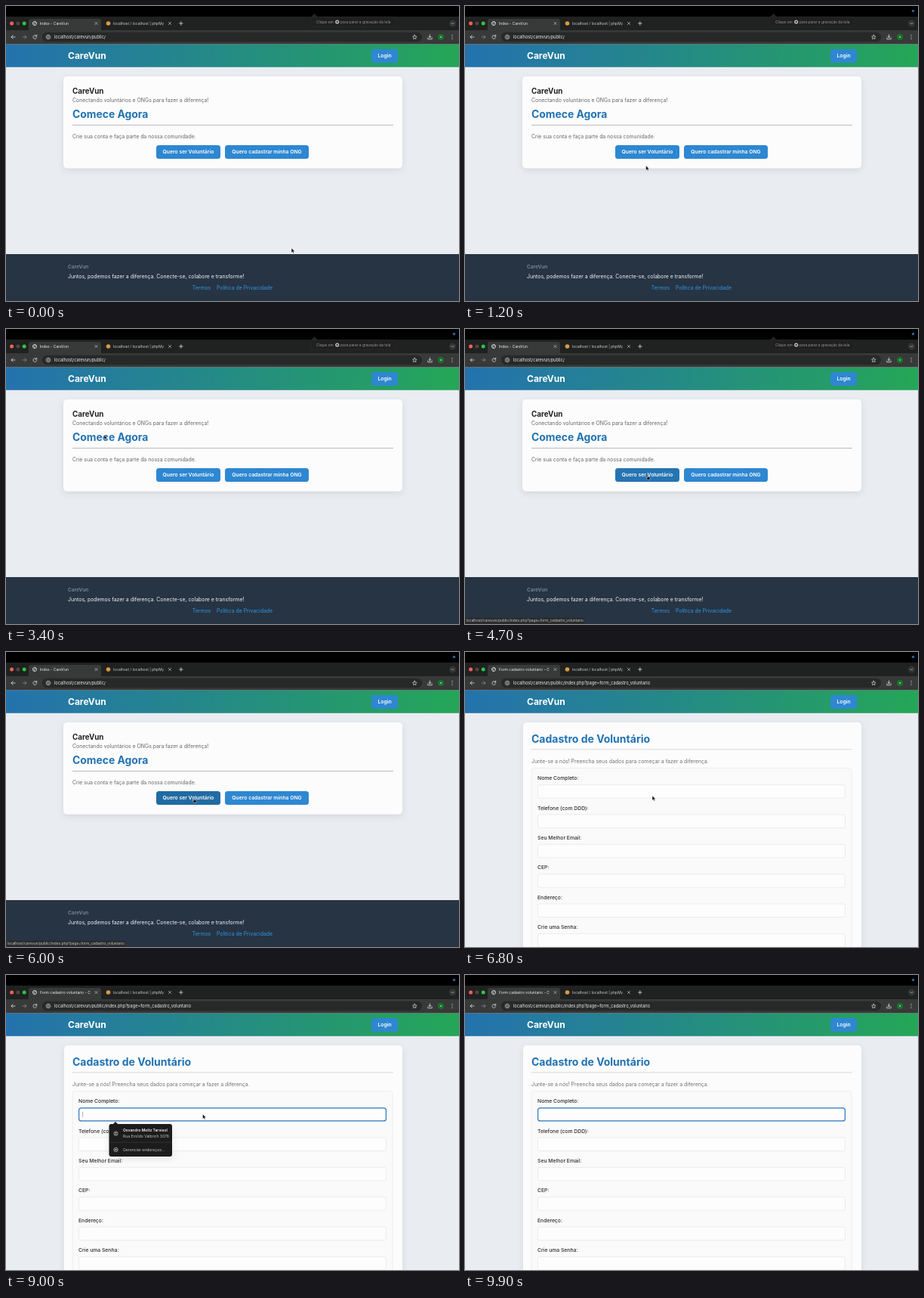
An HTML page for the animation above (10000 ms loop, 600 by 390 pixels).

```html
<!DOCTYPE html>
<html lang="pt-BR">
<head>
<meta charset="utf-8">
<title>CareVun</title>
<style>
html, body { margin: 0; width: 100%; height: 100%; overflow: hidden; background: #000; }
svg { display: block; width: 100%; height: 100%; }
text { font-family: Inter, "Open Sans", sans-serif; white-space: pre; }
</style>
</head>
<body>
<svg id="stage" viewBox="0 0 600 390"></svg>
<script>
const LOOP = 10000;
const FORM_OPENS = 6300, FIELD_FOCUS = 7400, DISMISS = 9200;
const BLUE = '#2e87d1';
const BODY = 6.9;
const brand = 'CareVun';
const baseUrl = 'localhost/carevun/public/';
const formUrl = baseUrl + 'index.php?page=form_cadastro_voluntario';

const rect = (x, y, w, h, fill, r = 0, extra = '') =>
  `<rect x="${x}" y="${y}" width="${w}" height="${h}" rx="${r}" fill="${fill}" ${extra}/>`;
const circle = (x, y, r, fill, extra = '') => `<circle cx="${x}" cy="${y}" r="${r}" fill="${fill}" ${extra}/>`;
const line = (d, stroke, w = 0.8) =>
  `<path d="${d}" fill="none" stroke="${stroke}" stroke-width="${w}" stroke-linecap="round" stroke-linejoin="round"/>`;
const text = (x, y, size, fill, value, weight = 400, anchor = 'start') =>
  `<text x="${x}" y="${y}" font-size="${size}" fill="${fill}" font-weight="${weight}" text-anchor="${anchor}">${value}</text>`;
const group = (id, body) => `<g id="${id}">${body}</g>`;
const button = (id, x, y, w, h, label) =>
  rect(x, y, w, h, BLUE, 3.5, `id="${id}"`) + text(x + w / 2, y + h / 2 + 2.4, 6.8, '#fff', label, 600, 'middle');
const cross = (x, y) => line(`M${x - 1.6} ${y - 1.6}l3.2 3.2m0 -3.2l-3.2 3.2`, '#c4c4c4', 0.7);

function menuBar() {
  const items = [[53, 'Arquivo'], [83, 'Editar'], [109, 'Visualização'], [149, 'Histórico'], [183, 'Favoritos'],
    [216, 'Perfis'], [242, 'Guia'], [346, 'Janela'], [372, 'Ajuda'], [537, 'Qua. 23 de abr.  09:13']];
  const icons = [409, 423, 437, 450, 464, 479, 499, 513, 526];
  return circle(12, 7, 2.4, '#4c4c4c') + text(23, 9, 5, '#555', 'Navega', 700) +
    items.map(([x, label]) => text(x, 9, 5, '#444', label)).join('') +
    icons.map((x, i) => i % 2 ? rect(x - 2.2, 5, 4.4, 4.4, '#414141', 1) : circle(x, 7, 2.4, '#484848')).join('') +
    rect(521, 5.5, 2.5, 3, '#315d96', 1);
}

function browser() {
  return rect(0, 0, 600, 14, '#000') + rect(0, 14, 600, 19, '#202121') + rect(0, 32, 600, 18.5, '#383939') +
    ['#ff5f57', '#4d4640', '#28c840'].map((c, i) => circle(7.6 + i * 8.3, 23, 2.5, c)).join('') +
    '<path d="M27 33q3 0 3 -3V20q0 -3 3 -3H123q3 0 3 3V30q0 3 3 3z" fill="#383939"/>' +
    circle(38, 23, 2.6, 'none', 'stroke="#ddd" stroke-width=".8"') +
    line('M35.7 22.4l2 1v2M38.2 20.7v1.3l2 .5', '#ddd', 0.7) +
    '<text id="tabTitle" x="45" y="24.8" font-size="4.95" fill="#eee"></text>' + cross(119.5, 23) +
    circle(135.5, 23, 2.8, '#d99a45') + text(142, 24.8, 4.95, '#cfcfcf', 'localhost / localhost | phpMy') +
    rect(206, 18, 8, 10, 'url(#tabFade)') + cross(217, 23) +
    line('M229.5 23h4.6m-2.3 -2.3v4.6', '#ddd') +
    circle(591.5, 23, 4.6, '#343535') + line('M589.9 22.4l1.6 1.6 1.6 -1.6', '#ccc', 0.7) +
    rect(48, 34.7, 503, 12.6, '#272828', 6.3) +
    line('M12 41H7m2.2 -2.2L7 41l2.2 2.2', '#ddd') + line('M22 41h5m-2.2 -2.2L27 41l-2.2 2.2', '#8a8a8a') +
    line('M40.4 39.8a2.4 2.4 0 1 0 .3 1.8M40.7 38.2v1.8h-1.8', '#ddd') +
    circle(56, 41, 4.3, '#3a3b3b') + circle(56, 41, 2.4, 'none', 'stroke="#ddd" stroke-width=".7"') +
    line('M56 40.8v1.2M56 39.7v.1', '#ddd', 0.6) +
    '<text id="url" x="64" y="43" font-size="5.65" fill="#ededed"></text>' +
    line('M541.3 38.2l.8 1.9 2 .2-1.5 1.4.4 2-1.7-1-1.7 1 .4-2-1.5-1.4 2-.2z', '#ddd', 0.7) +
    line('M561.5 38v3.8m-1.7 -1.6l1.7 1.7 1.7 -1.7M558.8 42v1.8h5.4V42', '#ddd') +
    circle(576, 41, 4, '#17752b') + circle(576, 41, 0.9, '#a9d8b0') +
    [38.7, 41, 43.3].map(y => circle(591, y, 0.6, '#ddd')).join('');
}

function header() {
  return rect(0, 50.5, 600, 30.3, 'url(#brandGradient)') + text(82, 70, 12, '#fff', brand, 700) +
    button('login', 484, 57, 35, 18, 'Login');
}

function homePage() {
  return rect(76, 93, 449, 121.5, '#fdfcfd', 5, 'filter="url(#shadow)"') +
    text(88, 115.6, 9.8, '#222', brand, 700) +
    text(88, 127.3, BODY, '#666', 'Conectando voluntários e ONGs para fazer a diferença!') +
    text(88, 148.3, 13.9, '#2173b3', 'Comece Agora', 700) +
    rect(88, 157, 425, 0.9, '#b0b2b5') +
    text(88, 175.4, BODY, '#666', 'Crie sua conta e faça parte da nossa comunidade.') +
    button('volunteer', 199, 184, 85, 18, 'Quero ser Voluntário') +
    button('ngo', 290, 184, 111, 18, 'Quero cadastrar minha ONG') +
    rect(0, 328, 600, 62, '#273444') +
    text(82, 347.2, 6.5, '#7f8993', brand, 600) +
    text(82, 360.3, BODY, '#f2f4f6', 'Juntos, podemos fazer a diferença. Conecte-se, colabore e transforme!') +
    text(259, 375.2, BODY, '#3097df', 'Termos', 400, 'middle') +
    text(316, 375.2, BODY, '#3097df', 'Política de Privacidade', 400, 'middle');
}

function formPage() {
  const labels = ['Nome Completo:', 'Telefone (com DDD):', 'Seu Melhor Email:', 'CEP:', 'Endereço:', 'Crie uma Senha:'];
  const field = (label, i) => {
    const y = i * 39.35;
    return text(96, 169.3 + y, 6.8, '#2a2a2a', label, 500) +
      rect(96.5, 175.6 + y, 407, 17.6, '#fdfdfd', 2.5, 'stroke="#e5e6e7" stroke-width=".7"');
  };
  return rect(77, 93, 448, 310, '#fdfcfd', 5, 'filter="url(#shadow)"') +
    text(88, 120, 14, '#2173b3', 'Cadastro de Voluntário', 700) +
    rect(88, 128.3, 425, 1, '#d5d8db') +
    text(88, 147.2, BODY, '#707070', 'Junte-se a nós! Preencha seus dados para começar a fazer a diferença.') +
    rect(88, 153.5, 424, 250, '#fafafa', 3, 'stroke="#eaebec" stroke-width=".8"') +
    labels.map(field).join('');
}

function popup() {
  return '<path d="M141 198l4 -4 4 4z" fill="#1c1d1e"/>' +
    rect(136.5, 197, 83.5, 43, '#1c1d1e', 3, 'filter="url(#shadow)"') +
    circle(145.5, 209.5, 2.6, 'none', 'stroke="#ccc" stroke-width=".7"') + circle(145.5, 208.7, 0.9, '#ccc') +
    line('M143.9 211.3q1.6 -1.6 3.2 0', '#ccc', 0.7) +
    text(155, 207.4, 5, '#f1f1f1', 'Osvandro Meltz Tarvisol', 600) +
    text(155, 215.4, 5, '#c5c5c5', 'Rua Ernildo Valbrich 3078') +
    rect(136.5, 220.8, 83.5, 0.6, '#414244') +
    circle(145.5, 231, 2.6, 'none', 'stroke="#ccc" stroke-width=".8"') + circle(145.5, 231, 1.1, '#ccc') +
    text(155, 232.8, 5.15, '#c5c5c5', 'Gerenciar endereços...');
}

const tooltip = '<path d="M404 14.5l4.5 -4.5 4.5 4.5z" fill="#242424"/>' +
  rect(404, 14.3, 112, 13, '#202020', 3, 'stroke="#2e2e2e" stroke-width=".5"') +
  text(411, 22.8, 4.8, '#969696', 'Clique em') + circle(438.7, 21, 2.6, '#bbb') + rect(437.8, 20.1, 1.8, 1.8, '#202020', 0.4) +
  text(443, 22.8, 4.8, '#969696', 'para parar a gravação da tela');

const stage = document.getElementById('stage');
stage.innerHTML = `<defs>
  <linearGradient id="brandGradient"><stop stop-color="#2472ae"/><stop offset="1" stop-color="#25a657"/></linearGradient>
  <linearGradient id="tabFade"><stop stop-color="#202121" stop-opacity="0"/><stop offset="1" stop-color="#202121"/></linearGradient>
  <filter id="shadow" x="-10%" y="-10%" width="120%" height="130%">
    <feDropShadow dx="0" dy="3" stdDeviation="4" flood-color="#000" flood-opacity=".09"/></filter>
  </defs>` +
  rect(0, 0, 600, 390, '#e9ecf1') + group('home', homePage()) + group('form', formPage()) + header() + browser() +
  group('menu', menuBar()) + circle(593.5, 6.5, 1.7, '#2c63a5', 'id="dot"') + group('tooltip', tooltip) +
  group('status', rect(-3, 381.5, 161, 12, '#2b2c2d', 2) + text(1.5, 387.4, 4.85, '#c3c3c3', formUrl)) +
  group('focus', rect(96.6, 175.8, 406.8, 17.1, 'none', 3, 'stroke="#2f7abf" stroke-width="1.2"')) +
  rect(101.3, 180.7, 0.8, 7.4, '#222', 0, 'id="caret"') + group('popup', popup()) +
  group('cursor',
    '<path id="arrow" d="M0 0v6.2l1.5-1.3 1 2.1 1.1-.5-1-2h2z" fill="#111" stroke="#fff" stroke-width=".45"/>' +
    '<path id="hand" d="M-.4 -2q.8-.6 1 .3V.5l2 .5q.8.3.6 1.3L2.6 4.4H-.1L-2 2q-.3-1 .7-.6l.7.5V-1.5z" fill="#111" stroke="#fff" stroke-width=".45"/>');

const el = {};
stage.querySelectorAll('[id]').forEach(node => { el[node.id] = node; });

// Cursor waypoints: time, x, y
const path = [[0, 378, 320], [1050, 240, 211], [1800, 236, 211], [2200, 186, 166], [2800, 126, 142],
  [3400, 130, 140], [4400, 240, 195], [5400, 249, 195], [6400, 249, 195], [6800, 248, 190], [7300, 260.5, 184], [LOOP, 260.5, 184]];

const clamp = v => Math.max(0, Math.min(1, v));
const ramp = (t, start, length) => clamp((t - start) / length);
const show = (node, visible) => node.setAttribute('display', visible ? 'inline' : 'none');

function cursorAt(t) {
  const i = path.findIndex(p => p[0] > t);
  const [t0, x0, y0] = path[i - 1], [t1, x1, y1] = path[i];
  const p = (t - t0) / (t1 - t0), e = p * p * (3 - 2 * p);
  return [x0 + (x1 - x0) * e, y0 + (y1 - y0) * e];
}

function caretOpacity(t) {
  if (t < FIELD_FOCUS || t >= DISMISS) return 0;
  const phase = (t - FIELD_FOCUS) % 1000;
  return 1 - ramp(phase, 490, 200) + ramp(phase, 890, 110);
}

function render(t) {
  const onForm = t >= FORM_OPENS;
  const hovering = t >= 4500 && !onForm;
  show(el.home, !onForm);
  show(el.form, onForm);
  el.tabTitle.textContent = onForm ? 'Form cadastro voluntario - C' : 'Index - ' + brand;
  el.url.textContent = onForm ? formUrl : baseUrl;
  const hover = ramp(t, 4500, 300);
  el.volunteer.setAttribute('fill', `rgb(${46 - 13 * hover},${135 - 28 * hover},${209 - 47 * hover})`);
  const menu = ramp(t, 1200, 250) * (1 - ramp(t, 2000, 200));
  el.menu.setAttribute('opacity', menu);
  el.dot.setAttribute('opacity', ramp(t, 50, 300) * (1 - menu));
  el.tooltip.setAttribute('opacity', 1 - ramp(t, 4900, 250));
  show(el.status, t >= 4700 && !onForm);
  show(el.focus, t >= FIELD_FOCUS);
  el.caret.setAttribute('opacity', caretOpacity(t));
  show(el.popup, t >= FIELD_FOCUS + 100 && t < DISMISS);
  show(el.cursor, t < DISMISS);
  show(el.arrow, !hovering);
  show(el.hand, hovering);
  el.cursor.setAttribute('transform', `translate(${cursorAt(t)})`);
}

const start = performance.now();
function tick() {
  render((performance.now() - start) % LOOP);
  requestAnimationFrame(tick);
}
tick();
</script>
</body>
</html>
```
